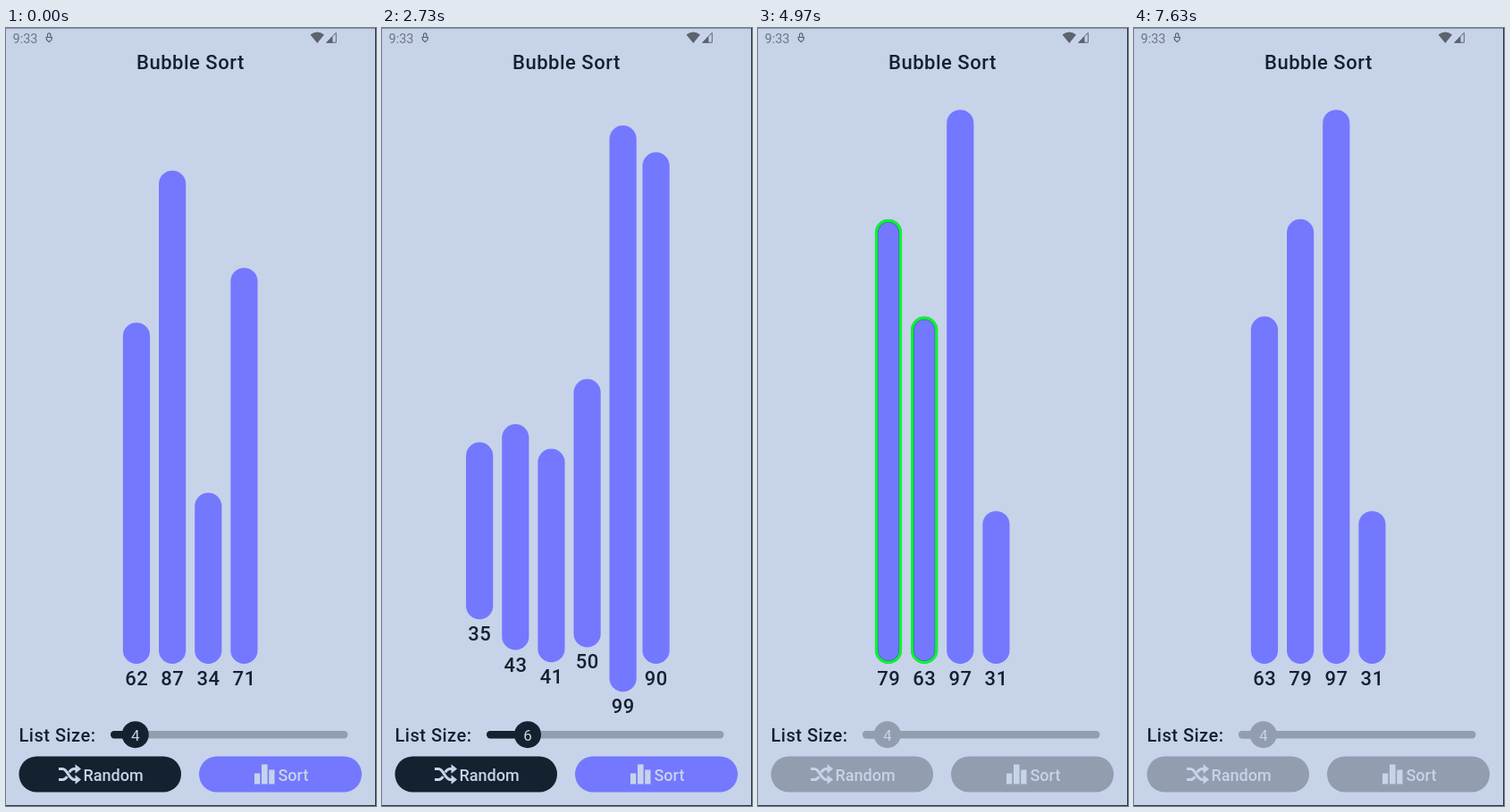
An HTML page with a canvas for the animation above (8000 ms loop, 414 by 870 pixels).

```html
<!DOCTYPE html>
<html lang="en">
<head>
<meta charset="utf-8">
<title>Bubble Sort</title>
<style>
html, body { margin: 0; height: 100%; overflow: hidden; background: #c7d3e9; }
canvas { display: block; }
</style>
</head>
<body>
<canvas id="stage" width="414" height="870"></canvas>
<script>
const ctx = document.getElementById('stage').getContext('2d');
const LOOP = 8000;
const BG = '#c7d3e9', INK = '#14212f', BAR = '#7378ff', OVERLAP = '#5a5bff';
const GREY = '#929db0', STATUS = '#5c646e', GREEN = '#00ff22';
const BASE = 711, PITCH = 40.15, BAR_W = 30.2, MID = 206.2, STIFF = 20;

// Each step: time, bar values, optional slot of every bar
const steps = [
  [0, [62, 87, 34, 71]],
  [2378, [82, 56, 43, 67, 70]],
  [2566, [35, 43, 41, 50, 99, 90]],
  [2747, [58, 74, 66, 61, 80]],
  [2840, [66, 80, 67, 48]],
  [2990, [51, 43, 99]],
  [3428, [79, 63, 97, 31]],
  [5490, [79, 63, 97, 31], [1, 0, 2, 3]]
];
// Compared pairs: start, end, bars
const compares = [[4968, 6018, [0, 1]], [6578, 7628, [0, 2]]];
const SORT_START = 4968;

const barHeight = v => 6.8 * v - 40;

// Critically damped spring
function advance(s, dt) {
  const o = s.p - s.to, c = s.v + STIFF * o, e = Math.exp(-STIFF * dt);
  const d = o + c * dt;
  s.p = s.to + d * e;
  s.v = (c - STIFF * d) * e;
}

function pose(t) {
  let bars = [], last = 0;
  for (const [at, values, slots] of steps) {
    if (at > t) break;
    bars.forEach(b => { advance(b.x, (at - last) / 1000); advance(b.y, (at - last) / 1000); });
    bars = values.map((value, i) => {
      const slot = slots ? slots[i] : i;
      const x = MID + PITCH * (slot - (values.length - 1) / 2);
      const y = BASE - barHeight(value);
      const b = bars[i] || { x: { p: x, v: 0 }, y: { p: y, v: 0 } };
      b.x.to = x;
      b.y.to = y;
      b.value = value;
      return b;
    });
    last = at;
  }
  bars.forEach(b => { advance(b.x, (t - last) / 1000); advance(b.y, (t - last) / 1000); });
  return bars;
}

function pill(x, y, w, h, inset = 0) {
  const p = new Path2D();
  w -= 2 * inset;
  h -= 2 * inset;
  p.roundRect(x + inset, y + inset, w, h, Math.min(w, h) / 2);
  return p;
}

function fill(path, color) {
  ctx.fillStyle = color;
  ctx.fill(typeof path === 'string' ? new Path2D(path) : path);
}

function stroke(path, color, width) {
  ctx.strokeStyle = color;
  ctx.lineWidth = width;
  ctx.stroke(typeof path === 'string' ? new Path2D(path) : path);
}

function text(str, x, y, size, color, { weight = 500, align = 'left', gap = 0 } = {}) {
  ctx.font = `${weight} ${size}px Roboto, sans-serif`;
  ctx.letterSpacing = gap + 'px';
  ctx.textAlign = align;
  ctx.fillStyle = color;
  ctx.fillText(str, x, y);
}

function drawStatus() {
  text('9:33', 7.5, 16.5, 14.5, '#6c7582', { weight: 400 });
  stroke('M45 10.5h6.5l-.6 2.6l-2.7 2.6l-2.7 -2.6z', STATUS, 1.2);
  stroke('M46.5 10V7.5a1.7 1.7 0 0 1 3.4 0V10', STATUS, 1.2);
  fill('M340.5 7.5Q348.3 1.5 356 7.5L348.3 17z', STATUS);
  stroke('M358.8 16.2L369.3 5.3V16.2z', STATUS, 1);
  fill('M358 16.7L365.5 9V16.7z', STATUS);
}

function drawBars(t) {
  const bars = pose(t);
  const active = (compares.find(([a, b]) => t >= a && t < b) || [0, 0, []])[2];
  const drawn = new Path2D();
  ctx.save();
  ctx.beginPath();
  ctx.rect(0, 60, 414, 712);
  ctx.clip();
  bars.forEach((b, i) => {
    const box = [b.x.p - BAR_W / 2, b.y.p, BAR_W, barHeight(b.value)];
    const shape = pill(...box);
    fill(shape, BAR);
    ctx.save();
    ctx.clip(drawn);
    fill(shape, OVERLAP);
    ctx.restore();
    drawn.addPath(shape);
    if (active.includes(i)) {
      stroke(pill(...box, 3.2), '#2b7f86', 1);
      stroke(pill(...box, 1.5), GREEN, 2.8);
    }
  });
  for (const b of bars) {
    text(b.value, b.x.p + .2, b.y.p + barHeight(b.value) + 24, 22, INK, { align: 'center', gap: .5 });
  }
  ctx.restore();
  return bars.length;
}

function drawControls(count, sorting) {
  const dark = sorting ? GREY : INK;
  const knob = 144.7 + 9.15 * (count - 4);
  text('List Size:', 14.5, 798, 20, INK, { gap: .5 });
  fill(pill(117, 786, 265.5, 8.4), GREY);
  fill(pill(117, 786, knob - 117, 8.4), dark);
  fill(pill(knob - 15, 775.2, 30, 30), dark);
  text(count, knob, 796.5, 17, BG, { weight: 400, align: 'center' });

  fill(pill(14.5, 814.5, 181.5, 40), dark);
  stroke('M59 828.5h4.5c5 0 7 12 13 12H79M59 840.5h4.5c2.2 0 3.6 -1.6 4.8 -3.6' +
    'M70.7 832.4c1.4 -2.3 3 -3.9 5.3 -3.9H79', BG, 3);
  fill('M77.5 823.3L84 828.5L77.5 833.8zM77.5 835.3L84 840.5L77.5 845.8z', BG);
  text('Random', 86.5, 841.5, 18, BG);

  fill(pill(216, 814.5, 182, 40), sorting ? GREY : BAR);
  fill('M278 833.5h6.3v12h-6.3zM286 823.5h6.6v22H286zM294.2 829.5h6.3v16h-6.3z', BG);
  text('Sort', 304.5, 841.5, 18, BG);
}

function draw() {
  const t = performance.now() % LOOP;
  ctx.fillStyle = BG;
  ctx.fillRect(0, 0, 414, 870);
  drawStatus();
  text('Bubble Sort', 206.4, 46, 22, INK, { align: 'center', gap: .5 });
  drawControls(drawBars(t), t >= SORT_START);
  stroke('M0 .5H414', '#8a93a3', 1);
  stroke('M413.5 0V870M0 869.5H414', '#2a303a', 1);
  requestAnimationFrame(draw);
}
draw();
</script>
</body>
</html>
```
